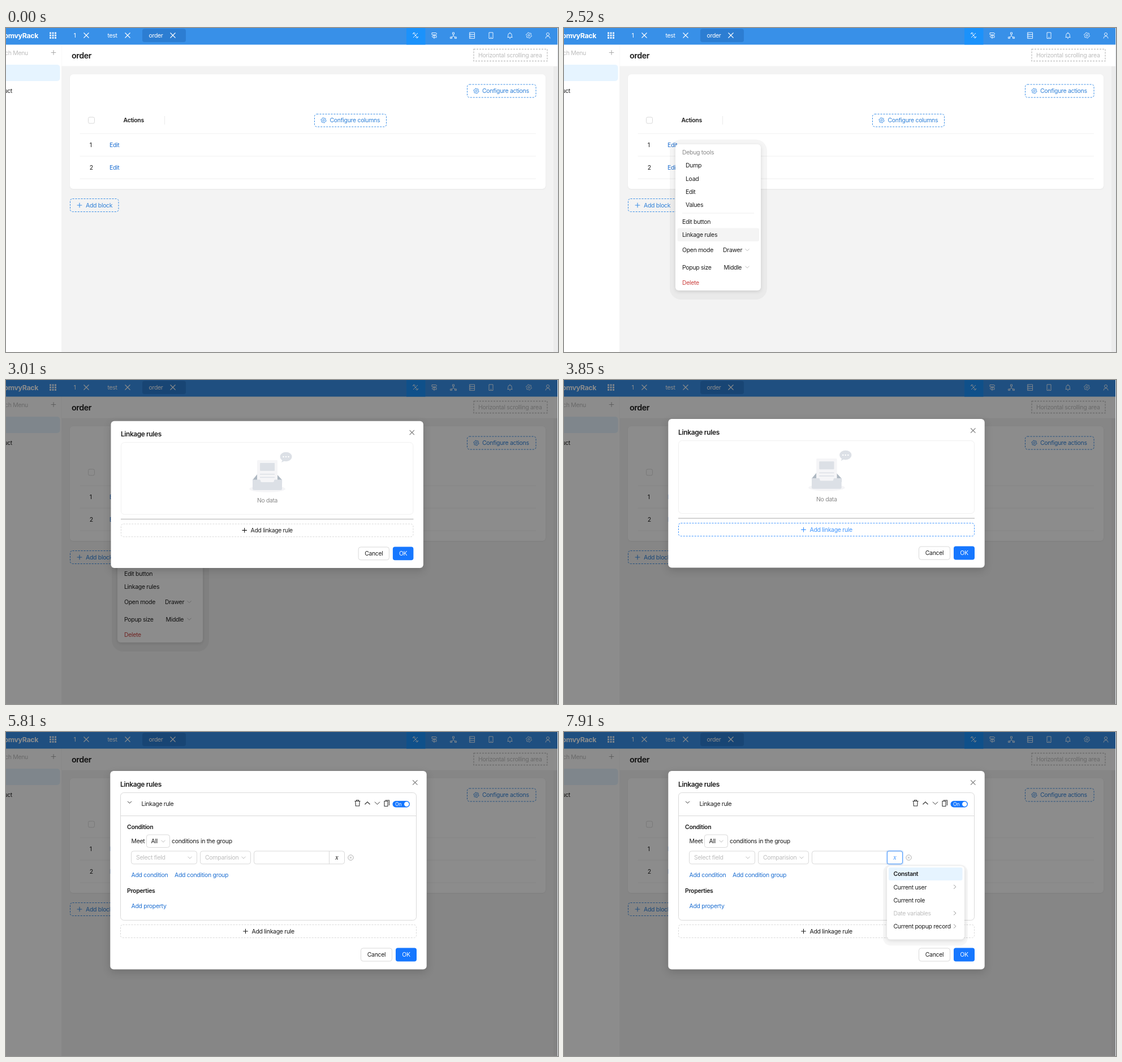
Animation, 976 px wide and 574 px high, one loop 8000 ms. Source, as an HTML page:

```html
<!DOCTYPE html>
<html lang="en">
<head>
<meta charset="utf-8">
<title>Linkage rules</title>
<style>
  html, body { margin: 0; width: 100%; height: 100%; overflow: hidden; background: #f3f3f3; }
  svg { display: block; width: 100vw; height: 100vh; }
  text { font: 10.5px Inter, "Open Sans", sans-serif; letter-spacing: -.03em; fill: #1c1c1c; white-space: pre; }
  .b { font-weight: 600; }
  .title { font-weight: 600; font-size: 14.3px; }
  .head { font-weight: 600; font-size: 12px; }
  .brand { font-weight: 700; font-size: 12.4px; fill: #fff; }
  .w { fill: #fff; }
  .link { fill: #1f70d2; }
  .blue { fill: #2f80d8; }
  .dim { fill: #bdbdbd; }
  .grey { fill: #8a8a8a; }
  .red { fill: #cc4340; }
  .var { font: italic 10.5px "Noto Serif", serif; }
  .float { filter: drop-shadow(0 2px 3px rgba(0,0,0,.12)); }
  .dialog { filter: drop-shadow(0 5px 7px rgba(0,0,0,.16)); }
  .card { filter: drop-shadow(0 1px 1px rgba(0,0,0,.05)); }
</style>
</head>
<body>
<svg id="stage" viewBox="0 0 976 574" xmlns="http://www.w3.org/2000/svg"></svg>
<script>
const BLUE = '#1677ff', LINE = '#d9d9d9', DASH = '#3a8ee6';

// Text is placed by its left edge and the middle of its capitals.
const text = (x, y, s, cls = '', extra = '') =>
  `<text x="${x}" y="${y}" dy=".36em" class="${cls}" ${extra}>${s}</text>`;
const rect = (x, y, x2, y2, fill, r = 0, extra = '') =>
  `<rect x="${x}" y="${y}" width="${x2 - x}" height="${y2 - y}" rx="${r}" fill="${fill}" ${extra}/>`;
const frame = (x, y, x2, y2, color = LINE, r = 4, extra = '') =>
  rect(x, y, x2, y2, 'none', r, `stroke="${color}" ${extra}`);
const dashed = (x, y, x2, y2, color, r = 4, extra = '') =>
  frame(x, y, x2, y2, color, r, `stroke-dasharray="3 2" ${extra}`);
const path = (d, color, width = 1, extra = '') =>
  `<path d="${d}" fill="none" stroke="${color}" stroke-width="${width}" ${extra}/>`;
const hline = (x, x2, y, color, width = 1) => path(`M${x} ${y}H${x2}`, color, width);
const group = (id, body, extra = '') => `<g id="${id}" ${extra}>${body}</g>`;

const cross = (x, y, r, color, width) =>
  path(`M${x - r} ${y - r}l${2 * r} ${2 * r}m0 ${-2 * r}l${-2 * r} ${2 * r}`, color, width);
const plus = (x, y, color, extra) => path(`M${x - 4.3} ${y}h8.6m-4.3 -4.3v8.6`, color, 1.1, extra);
const down = (x, y, color = '#bbb', r = 3.5) => path(`M${x - r} ${y - r / 2}l${r} ${r}l${r} ${-r}`, color);
const up = (x, y, color, r) => path(`M${x - r} ${y + r / 2}l${r} ${-r}l${r} ${r}`, color, 1.2);
const right = (x, y) => path(`M${x - 2} ${y - 3.5}l4 3.5l-4 3.5`, '#999');

function gear(x, y, color, r = 4.6) {
  let points = '';
  for (let i = 0; i < 24; i++) {
    const a = i * Math.PI / 12 + .13, d = i % 4 < 2 ? r : r * .78;
    points += `${(x + d * Math.cos(a)).toFixed(1)},${(y + d * Math.sin(a)).toFixed(1)} `;
  }
  return `<g fill="none" stroke="${color}"><polygon points="${points}"/><circle cx="${x}" cy="${y}" r="1.6"/></g>`;
}

function topBar() {
  let dots = '';
  for (let i = 0; i < 9; i++) {
    const x = 77 + i % 3 * 4.5, y = 7.5 + Math.floor(i / 3) * 4.2;
    dots += rect(x, y, x + 3, y + 3, '#eaf4ff');
  }
  const white = '#e6f2ff';
  const glyphs = [
    'M720 9l8 8m0-8l-8 8M719 11l2-3 3 2M724 16l3 2 2-3',
    'M753 8.500h7l2 1.700-2 1.700h-7zM761 13.500h-6l-2 1.700 2 1.700h6zM757 12v7',
    'M791 11v3l-4 3m4-3l4 3M789.500 8h3v3h-3zM785.500 16h3v2.500h-3zM793.500 16h3v2.500h-3z',
    'M819.500 8h9v10.500h-9zM819.500 11.500h9M819.500 15h9M821 9.800h1M821 13.300h1M821 16.700h1',
    'M854 8h7v10.500h-7zM856.500 16.500h2',
    'M886.500 16.500h9M887.700 16.500v-4a3.300 3.300 0 0 1 6.600 0v4M890 18.500h2M891 9v-1.500',
    'M954 18.500a4 4 0 0 1 8 0M955.500 11a2.500 2.500 0 1 1 5 0a2.500 2.500 0 1 1-5 0',
  ];
  return rect(0, 0, 976, 29.5, '#3890e8') + rect(708, 0, 741.5, 29.5, '#1b92fb') +
    rect(241, 1.5, 318, 25, '#2c7dd2', 4) +
    text(57, 13.5, 'LomvyRack', 'brand', 'text-anchor="end"') + dots +
    text(119.500, 13.5, '1', 'w') + text(179.5, 13.5, 'test', 'w') + text(252.5, 13.5, 'order', 'w') +
    [142, 215, 295].map(x => cross(x, 13, 4.5, '#fff', 1.1)).join('') +
    glyphs.map(d => path(d, white)).join('') + gear(924.5, 13, white, 5);
}

function page() {
  return rect(0, 0, 976, 574, '#f3f3f3') + rect(968, 68, 976, 574, '#ececec') +
    rect(0, 29, 98, 574, '#fff') + rect(98.5, 29, 976, 67.500, '#fff') + topBar() +
    rect(-10, 33, 73, 56, '#f1f1f1', 4, 'id="search"') +
    text(39, 44.5, 'Search Menu', 'dim', 'text-anchor="end"') + plus(84, 43.5, '#aaa') +
    rect(-10, 65, 95.5, 94, '#e6f4ff', 5) + text(11, 111.5, 'Product', '', 'text-anchor="end"') +
    text(116, 49, 'order', 'title') +
    dashed(827, 37.5, 957, 58.5, '#c4c4c4', 0, 'stroke-width="1.4"') +
    text(835, 48, 'Horizontal scrolling area', 'dim') +
    rect(113, 82, 954, 285, '#fff', 6, 'class="card"') +
    rect(130.5, 140, 937, 187, '#f0f0f0', 5, 'id="tableHead"') +
    dashed(815.5, 100, 937, 123, DASH) + gear(831.5, 111.5, DASH) + text(842, 111.5, 'Configure actions', 'blue') +
    dashed(545.5, 152.5, 672.5, 175, DASH) + gear(561.5, 163.500, DASH) + text(572.5, 163.5, 'Configure columns', 'blue') +
    frame(145.5, 158, 156.5, 169, LINE, 2.5) + text(207.5, 163.5, 'Actions', 'b') +
    path('M280.500 156v15', '#eaeaea') +
    [187, 227, 267].map(y => hline(130.5, 937, y, '#f0f0f0')).join('') +
    [1, 2].map(n => text(147.8, 167.5 + n * 40, n) + text(183, 167.5 + n * 40, 'Edit', 'link')).join('') +
    group('editHover', rect(177, 190, 210, 224, 'rgba(24,144,255,.07)') +
      rect(199, 191, 209, 201, '#1890ff') + path('M201.500 194h5m-5 2h5m-5 2h5', '#fff', .8)) +
    dashed(113.5, 302.5, 199, 325.5, DASH) + plus(130, 314, DASH) + text(141, 314, 'Add block', 'blue');
}

function menu() {
  const tools = ['Dump', 'Load', 'Edit', 'Values'].map((s, i) => text(215, 243.5 + i * 23.3, s)).join('');
  return group('menu',
    rect(187, 197.500, 359, 481, 'rgba(0,0,0,.04)', 20) +
    rect(197, 206, 348, 465, '#fff', 6, 'class="float"') +
    text(209, 220.5, 'Debug tools', 'grey') + tools + hline(209, 336, 328, '#eee') +
    rect(200.5, 354.5, 345, 378, '#f4f4f4', 3, 'id="menuHover"') +
    text(209, 343, 'Edit button') + text(209, 366.5, 'Linkage rules') +
    text(209, 393.5, 'Open mode') + text(281, 393.5, 'Drawer') + down(324, 393) +
    text(209, 424, 'Popup size') + text(282.5, 424, 'Middle') + down(324, 423.5) +
    text(209, 451, 'Delete', 'red'));
}

function emptyState() {
  const tone = '#dce0e6', pale = '#f5f5f7';
  const art = `<ellipse cx="462" cy="193" rx="32" ry="6" fill="${pale}"/>` +
    '<path d="M436 177l9-11h33l10 11v6h-52z" fill="#aeb8c2"/>' +
    rect(444, 142, 480, 182, pale, 1.5) + rect(449, 147, 475, 161, tone, 1) +
    hline(449, 475, 167, tone, 1.5) + hline(449, 475, 172.500, tone, 1.5) +
    `<path d="M436 176.500h12.500q1.500 0 1.500 2q0 2.500 2.500 2.500h19q2.500 0 2.500-2.500q0-2 1.500-2h12.500v16q0 2.500-2.500 2.500h-47q-2.500 0-2.500-2.500z" fill="${tone}"/>` +
    `<ellipse cx="495" cy="136" rx="10.5" ry="8.300" fill="${tone}"/><path d="M487 146l2-5 4 2z" fill="${tone}"/>` +
    [490.5, 495, 499.5].map(x => `<circle cx="${x}" cy="136" r="1.3" fill="#fff"/>`).join('');
  return group('empty', frame(202.5, 107.5, 725.5, 236.5, '#f0f0f0', 6) +
    `<g transform="translate(280 366) scale(1.0129) translate(-280 -366)">${art}</g>` +
    text(464.3, 211, 'No data', 'grey', 'text-anchor="middle"') + hline(202, 726, 245, '#c4c4c4', 1.6));
}

function rulePanel() {
  const ink = '#333';
  const conditionRow = group('row',
    frame(221.5, 211, 337.5, 233.8) + text(230, 222.5, 'Select field', 'dim') + down(325, 222.5) +
    frame(343.5, 211, 432.5, 233.8) + text(352, 222.5, 'Comparision', 'dim') + down(420, 222.5) +
    frame(438.5, 211, 598.5, 233.8) + path('M571.500 211v23', LINE) +
    frame(438.5, 211, 571.5, 233.8, '#4096ff', 4, 'id="inputGlow"') +
    rect(447, 216, 448, 229, '#222', 0, 'id="caret"') +
    frame(570, 210, 600, 235, 'rgba(22,119,255,.12)', 4, 'id="varGlow" stroke-width="2"') +
    frame(571.5, 211, 598.5, 233.8, '#4096ff', 3, 'id="varFrame"') +
    text(584.800, 222.5, 'x', 'var', 'id="varText" text-anchor="middle"') +
    '<circle cx="609.5" cy="222.5" r="4.700" fill="none" stroke="#aaa"/>' + cross(609.5, 222.5, 1.7, '#aaa', 1));
  return group('rule',
    frame(202.5, 107.5, 725.5, 304.5, LINE, 6, 'id="ruleFrame"') + hline(202.5, 725.5, 148.5, LINE) +
    down(218.5, 124.500, ink) + text(239.5, 127.5, 'Linkage rule') +
    path('M616.500 122.500h10M619.500 122.500v-1.700h4v1.700M617.800 122.500l.5 8.500h6.400l.5-8.500', ink, 1.1) +
    up(639, 126, ink, 4.5) + down(656.5, 126, ink, 4.5) +
    path('M669 122.500h6v9h-6zM670.500 121h7v9', ink, 1.1) +
    rect(683.5, 122, 714, 133.5, BLUE, 5.75) + text(688, 128, 'On', 'w', 'style="font-size:8.700px"') +
    '<circle cx="708.300" cy="127.800" r="4.300" fill="#fff"/>' +
    text(214, 168.5, 'Condition', 'b') + text(221.5, 193.5, 'Meet') +
    frame(248.5, 182, 289.5, 204.5) + text(256.5, 193.5, 'All') + down(278, 193.5) +
    text(293, 193.5, 'conditions in the group') + conditionRow +
    group('links', text(221.5, 224.5, 'Add condition', 'link', 'id="addCondition"') +
      text(298, 224.5, 'Add condition group', 'link') +
      text(214, 252.5, 'Properties', 'b') + text(221.5, 279.5, 'Add property', 'link')));
}

function variableMenu() {
  const items = ['Constant', 'Current user', 'Current role', 'Date variables', 'Current popup record'];
  return group('variables',
    rect(564, 235, 714, 378.5, 'rgba(0,0,0,.035)', 14) +
    rect(571, 237.500, 708, 367.5, '#fff', 6, 'class="float"') +
    rect(574, 240, 704.5, 263, '#e6f4ff', 3) +
    items.map((s, i) => text(582.5, 251.5 + i * 23.3, s, ['b', '', '', 'dim', ''][i])).join('') +
    [1, 3, 4].map(i => right(691, 251 + i * 23.3)).join(''));
}

function modal() {
  // The footer is drawn for a dialog whose bottom edge is at y = 0.
  const footer = group('footer',
    dashed(202.5, -79, 725.5, -56, LINE, 4, 'id="addFrame"') +
    group('addLabel', plus(423.5, -67.5, 'currentColor') + text(434.5, -67.5, 'Add linkage rule', '', 'style="fill:currentColor"')) +
    frame(627.5, -37.5, 682.5, -14.5) + text(655, -26, 'Cancel', '', 'text-anchor="middle"') +
    rect(689, -38, 726, -14, BLUE, 4) + text(707.5, -26, 'OK', 'w', 'text-anchor="middle"'));
  return group('modal',
    rect(184.3, 69, 743.7, 391.5, '#fff', 6, 'id="sheet" class="dialog"') +
    text(202, 92.5, 'Linkage rules', 'head') + cross(723.3, 89.5, 4.2, '#777', 1.1) +
    emptyState() + rulePanel() + footer + variableMenu());
}

const stage = document.getElementById('stage');
stage.innerHTML = page() + menu() + rect(0, 0, 976, 574, '#000', 0, 'id="mask"') + modal() +
  rect(975, 0, 976, 574, '#e4e8ec');

const el = Object.fromEntries([...stage.querySelectorAll('[id]')].map(e => [e.id, e]));
const show = (id, opacity) => {
  el[id].style.opacity = +opacity;
  el[id].style.visibility = opacity ? 'visible' : 'hidden';
};
const mix = (a, b, p) => `rgb(${a.map((v, i) => Math.round(v + (b[i] - v) * p))})`;
const INK = [28, 28, 28], EDGE = [217, 217, 217], HOVER = [64, 150, 255], LINK = [31, 112, 210], PALE = [105, 177, 255];

function render(t) {
  const ramp = (from, to) => Math.min(1, Math.max(0, (t - from) / (to - from)));
  const within = (from, to) => t >= from && t < to;
  const dimming = within(2940, 3010);

  show('editHover', within(980, 1330));
  show('search', dimming);
  show('tableHead', dimming);
  show('menu', ramp(1260, 1400) * (t >= 1330) * (1 - ramp(3010, 3220)));
  show('menuHover', t < 2940);
  show('mask', t < 2940 ? 0 : dimming ? .06 : .45);

  const hasRule = t >= 3990, hasRow = t >= 5600;
  const bottom = hasRow ? 420.5 : hasRule ? 391.5 : 332.6;
  const scale = 1 - .0127 * (1 - ramp(3010, 3150)) ** 2;
  show('modal', t >= 3010);
  el.modal.setAttribute('transform', `translate(280 366) scale(${scale}) translate(-280 -366)`);
  el.sheet.setAttribute('height', bottom - 69);
  el.ruleFrame.setAttribute('height', bottom - 87 - 107.5);
  el.footer.setAttribute('transform', `translate(0 ${bottom})`);
  el.links.setAttribute('transform', `translate(0 ${hasRow ? 29 : 0})`);
  show('empty', t >= 3010 && !hasRule);
  show('rule', hasRule);
  show('row', hasRow);

  const addHover = hasRule ? 0 : ramp(3570, 3850);
  el.addFrame.style.stroke = mix(EDGE, HOVER, addHover);
  el.addLabel.style.color = mix(INK, HOVER, addHover);
  el.addCondition.style.fill = mix(LINK, PALE, within(4830, 5460) ? ramp(4760, 4900) : 0);

  const varHover = ramp(6650, 6860), open = t >= 7560;
  show('inputGlow', open ? 0 : ramp(6230, 6580));
  show('caret', within(6580, 7070));
  show('varFrame', varHover);
  show('varGlow', open);
  el.varText.style.fill = mix(INK, HOVER, varHover);
  show('variables', open ? ramp(7490, 7770) : 0);
}

function tick() {
  render(performance.now() % 8000);
  requestAnimationFrame(tick);
}
tick();
</script>
</body>
</html>
```
